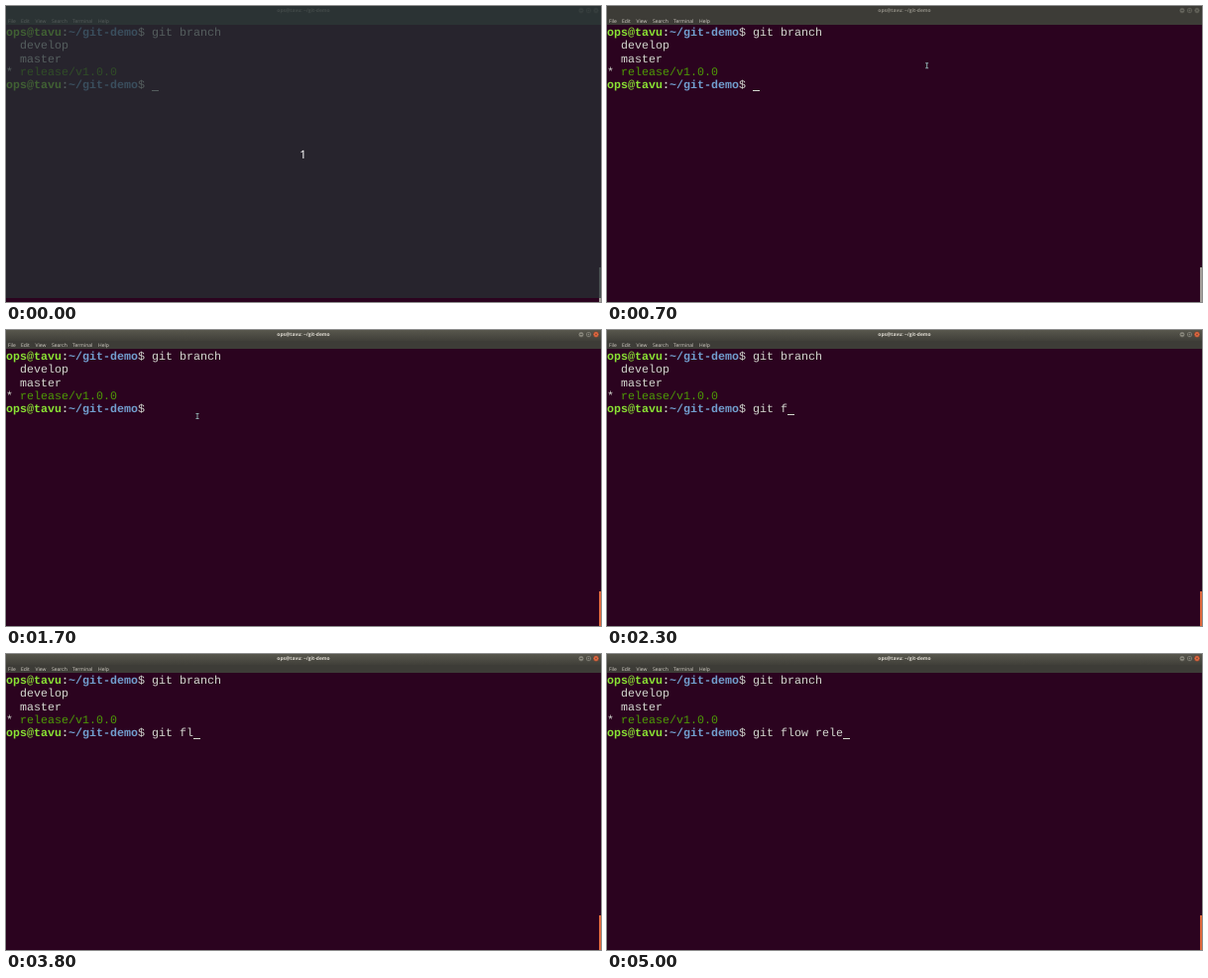
Write an HTML page that moves like this. It is 600x299 px and loops after 5.2 s.

```html
<!DOCTYPE html>
<html lang="en">
<head>
<meta charset="utf-8">
<title>Terminal</title>
<style>
  html, body { margin: 0; width: 100%; height: 100%; overflow: hidden; background: #2b031f; }
  svg { display: block; width: 600px; height: 299px; }
  text { white-space: pre; text-rendering: geometricPrecision; }
  .term { font: 11.667px "Liberation Mono", monospace; fill: #d3d7cf; }
  .bold { font-weight: 700; }
  .user { fill: #8ae234; }
  .path { fill: #729fcf; }
  .current { fill: #4e9a06; }
  .menu { font: 5px "Open Sans", sans-serif; fill: #d6d2c9; }
  .title { font: 700 4.9px "Open Sans", sans-serif; text-anchor: middle; }
  .count { font: 11.5px "Noto Sans", sans-serif; fill: #fff; text-anchor: middle; }
</style>
</head>
<body>
<svg viewBox="0 0 600 299">
  <defs>
    <linearGradient id="bar" x2="0" y2="1">
      <stop offset="0" stop-color="#58574d"/>
      <stop offset="1" stop-color="#403f39"/>
    </linearGradient>
  </defs>
  <rect width="600" height="299" fill="#2b031f"/>
  <rect width="600" height="19" fill="#3d3c37"/>

  <g id="idle">
    <text class="title" x="300" y="6.3" fill="#8f8c83">ops@tavu: ~/git-demo</text>
    <g fill="#65645c" stroke="#2f2e2a" stroke-width=".5">
      <circle cx="580" cy="4.5" r="2.9"/>
      <circle cx="587.5" cy="4.5" r="2.9"/>
      <circle cx="595" cy="4.5" r="2.9"/>
    </g>
    <rect x="598" y="264" width="2" height="35" fill="#a5a09b"/>
  </g>

  <g id="focus">
    <rect width="600" height="11" fill="url(#bar)"/>
    <text class="title" x="300" y="6.3" fill="#dfdbd2">ops@tavu: ~/git-demo</text>
    <g fill="#87857a" stroke="#33322d" stroke-width=".5">
      <circle cx="580" cy="4.5" r="2.9"/>
      <circle cx="587.5" cy="4.5" r="2.9"/>
      <circle cx="595" cy="4.5" r="2.9" fill="#ec6a40"/>
    </g>
    <rect x="598" y="264" width="2" height="35" fill="#e0683c"/>
  </g>

  <path d="M578.7 4.5h2.6M586.4 3.4h2.2v2.2h-2.2zM594 3.5l2 2m0-2l-2 2" fill="none" stroke="#35342f" stroke-width=".6"/>
  <g id="menu" class="menu"></g>
  <g id="lines" class="term"></g>
  <rect id="caret" y="85" width="7" height="1" fill="#d3d7cf"/>
  <path id="pointer" d="M-1.5-2.5h3M0-2.5v5M-1.5 2.5h3" fill="none" stroke="#8aa5a8"/>

  <g id="countdown">
    <rect width="600" height="295" fill="rgb(38,48,51)" opacity=".73"/>
    <text class="count" x="299.5" y="154">1</text>
  </g>
</svg>
<script>
const LOOP = 5200, STEP = 100, CELL = 7, ROW = 13.25, PROMPT = 21;
const $ = id => document.getElementById(id);

function addText(parent, x, y, str, cls = "") {
  const el = document.createElementNS("http://www.w3.org/2000/svg", "text");
  el.setAttribute("x", x);
  el.setAttribute("y", y);
  el.setAttribute("class", cls);
  el.textContent = str;
  parent.append(el);
  return el;
}

const put = (col, row, str, cls) => addText($("lines"), col * CELL, 30 + row * ROW, str, cls);

function prompt(row) {
  put(0, row, "ops@tavu", "bold user");
  put(8, row, ":", "bold");
  put(9, row, "~/git-demo", "bold path");
  put(19, row, "$");
}

[["File", 2], ["Edit", 15], ["View", 29.5], ["Search", 46], ["Terminal", 67], ["Help", 93]]
  .forEach(([label, x]) => addText($("menu"), x, 16.7, label));

prompt(0);
put(PROMPT, 0, "git branch");
put(2, 1, "develop");
put(2, 2, "master");
put(0, 3, "*");
put(2, 3, "release/v1.0.0", "current");
prompt(4);
const command = put(PROMPT, 4, "");

// Command line contents from each moment on, including a corrected typo
const typing = [
  [0, ""], [1800, "g"], [1900, "gi"], [2000, "git"], [2300, "git f"],
  [2700, "git fo"], [3000, "git fow"], [3100, "git fo"], [3500, "git f"],
  [3800, "git fl"], [4000, "git flo"], [4200, "git flow"], [4400, "git flow r"],
  [4500, "git flow re"], [4700, "git flow rel"], [5000, "git flow rele"]
];

const clamp = v => Math.min(1, Math.max(0, v));
const show = (el, on) => el.setAttribute("visibility", on ? "visible" : "hidden");

function draw(time) {
  const t = Math.floor((time % LOOP) / STEP) * STEP;

  show($("countdown"), t < 400);

  const focus = clamp((t - 1100) / 300);
  $("focus").setAttribute("opacity", focus);
  show($("idle"), focus < 1);

  const move = 1 - (1 - clamp((t - 400) / 700)) ** 2;
  const x = 590 + (193 - 590) * move, y = 5 + (87 - 5) * move;
  $("pointer").setAttribute("transform", `translate(${x} ${y})`);
  show($("pointer"), t >= 500 && t < 1800);

  const str = typing.findLast(([at]) => t >= at)[1];
  command.textContent = str;
  $("caret").setAttribute("x", (PROMPT + str.length) * CELL);
  show($("caret"), t < 1700 || t >= 1800);
}

const start = performance.now();
function tick() {
  draw(performance.now() - start);
  requestAnimationFrame(tick);
}
tick();
</script>
</body>
</html>
```
